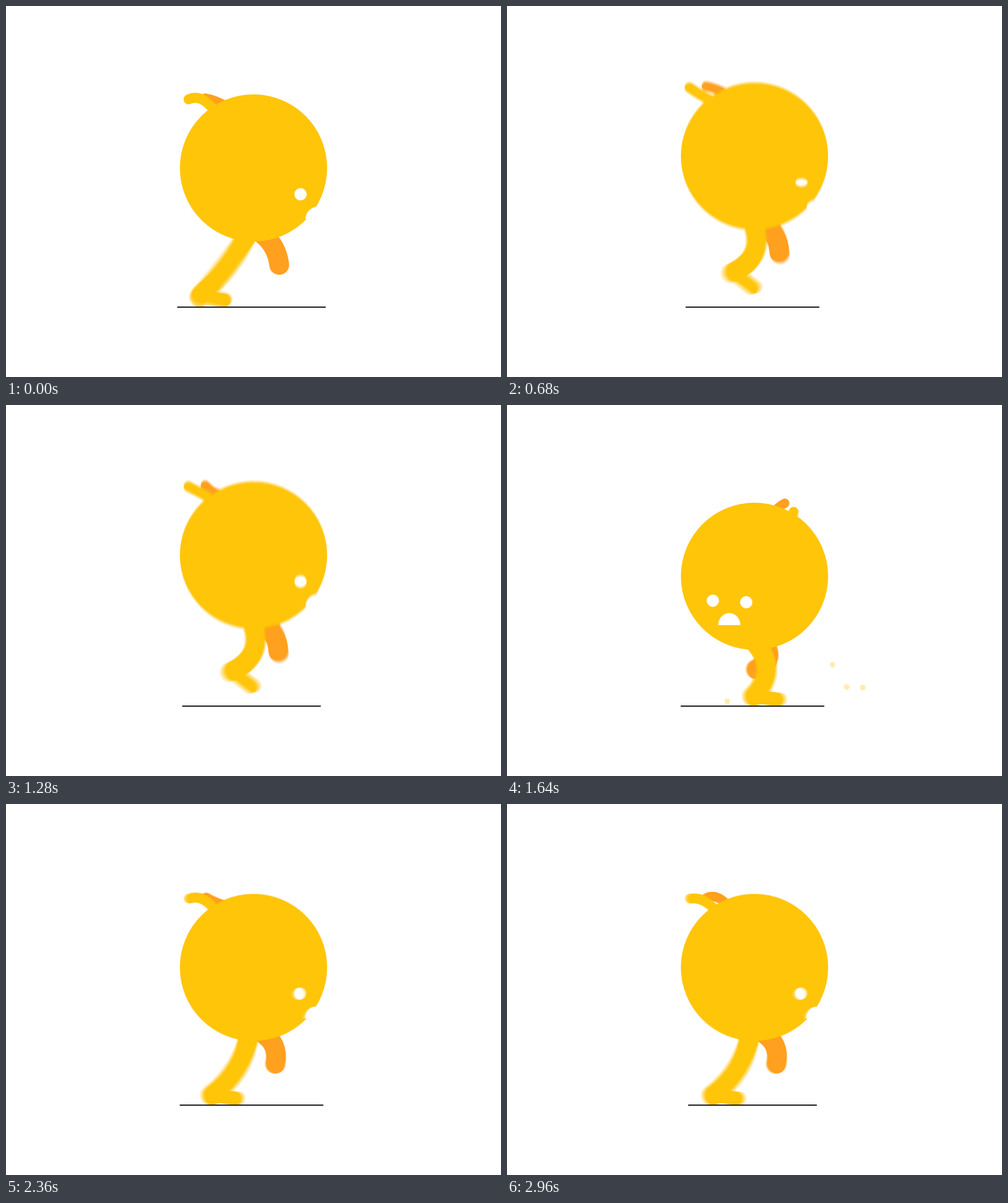
Write an HTML page with a canvas that moves like this. It is 800 by 600 pixels and loops after 3 s.

```html
<!DOCTYPE html>
<html lang="en">
<head>
<meta charset="utf-8">
<title>Hopping ball</title>
<style>
html, body { margin: 0; width: 100%; height: 100%; overflow: hidden; background: #fff; }
canvas { display: block; }
</style>
</head>
<body>
<canvas id="stage" width="800" height="600"></canvas>
<script>
const LOOP = 3000, STEP = 40, HOP = 600, LAND = 330, WAVE = 480;
const YELLOW = '#ffc509', ORANGE = '#ffa01e';
const SAMPLES = 10, SHUTTER = 18;
const { PI, sin, cos, hypot, sqrt, max, min, abs } = Math;

const stage = document.getElementById('stage').getContext('2d');
const layer = document.createElement('canvas');
layer.width = 800;
layer.height = 600;
const g = layer.getContext('2d');

const lerp = (a, b, p) => a + (b - a) * p;
const mix = (a, b, p) => a.map((v, i) => lerp(v, b[i], p));

// Eased 0 to 1 between two times
function ease(t, from, to) {
  const p = min(1, max(0, (t - from) / (to - from)));
  return p * p * (3 - 2 * p);
}

function curve(color, width, [x0, y0], [cx, cy], [x1, y1]) {
  g.strokeStyle = color;
  g.lineWidth = width;
  g.beginPath();
  g.moveTo(x0, y0);
  g.quadraticCurveTo(cx, cy, x1, y1);
  g.stroke();
}

function oval(color, x, y, rx, ry = rx, from = 0) {
  g.fillStyle = color;
  g.beginPath();
  g.ellipse(x, y, rx, ry, 0, from, PI * 2);
  g.fill();
}

// The knee moves forward as the foot comes closer than the leg's length
function drawLeg(color, hip, foot, length, flex) {
  const dx = foot[0] - hip[0], dy = foot[1] - hip[1], d = hypot(dx, dy);
  const bend = flex * sqrt(max(0, length ** 2 - d ** 2)) / d;
  const [mx, my] = mix(hip, foot, .5);
  curve(color, 32, hip, [mx + dy * bend, my - dx * bend], foot);
}

function drawBackLeg(t) {
  const swing = cos((t - 35) / HOP * 2 * PI);
  drawLeg(ORANGE, [12, 105], [15.5 + 28 * swing, 152.5 + 4.5 * swing], 62, .74);
}

function drawFrontLeg(t, cy) {
  const s = min(t / LAND, 1);
  const heel = t < LAND
    ? [lerp(311, 459, sin(s * PI / 2)), 471 - 290 * s * (1 - s) ** 2]
    : [lerp(459, 311, (t - LAND) / (HOP - LAND)), 471];
  const tilt = .13 + .6 * sin(s * 2 * PI) * (1 - s / 2);
  const toe = [heel[0] + 40 * cos(tilt), heel[1] + 40 * sin(tilt)];
  drawLeg(YELLOW, [lerp(400, heel[0], .1), cy + 106], heel, 130, .42);
  curve(YELLOW, 22, heel, heel, toe);
}

function drawTuft(color, width, base, tip, lift, turn) {
  const [mx, my] = mix(base, tip, .5);
  const arc = 16 * sin(PI * turn);
  curve(color, width, base, [mx, my - lift * (1 - turn) - arc], [tip[0], tip[1] - arc]);
}

function drawHair(now, turn) {
  const wave = shift => cos(now / WAVE * 2 * PI - shift);
  drawTuft(ORANGE, 15, mix([-44, -100], [40, -100], turn),
    mix([-78, -113], [70, -111], turn), 13 * wave(1.3), turn);
  drawTuft(YELLOW, 16, mix([-58, -85], [75, -75], turn),
    mix([-105, -111], [91, -95], turn), 9 + 15 * wave(0), turn);
}

function drawFace(turn, open) {
  const x = lerp(76, -91, turn), y = lerp(42.5, 39, turn);
  oval('#fff', x, y, 10, 10 * open);
  oval('#fff', x + 54, y + 2.5, 10, 10 * open);
  oval('#fff', lerp(103, -64.5, turn), lerp(82.5, 78.5, turn),
    19 - 3.5 * turn ** 8, 19.5 * open, PI);
}

function drawDust(t) {
  if (t < 270) return;
  const p = ease(t, 270, 440);
  g.globalAlpha = lerp(1, .32, p) * (1 - ease(t, 440, 480));
  for (const end of [[526, 420], [549, 456], [575, 457], [356, 479]]) {
    const start = end[0] > 400 ? [504, 467] : [429, 479];
    oval(YELLOW, ...mix(start, end, p), lerp(3, 4.5, p));
  }
  g.globalAlpha = 1;
}

function drawScene(time, now) {
  const t = (time + LOOP) % HOP;
  const cy = 262 - 38 * ease(t, 0, 160) + 53 * ease(t, 160, 375) - 15 * ease(t, 440, HOP);
  const turn = ease(t, 90, 275) - .14 * ease(t, 280, 440) - .86 * ease(t, 440, 567);
  const open = 1 - .35 * max(0, 1 - abs(now - 680) / 80);

  g.fillStyle = '#fff';
  g.fillRect(0, 0, 800, 600);
  g.lineCap = g.lineJoin = 'round';

  g.save();
  g.translate(400, cy);
  drawBackLeg(t);
  drawHair(now, turn);
  oval(YELLOW, 0, 0, 119);
  drawFace(turn, open);
  g.restore();

  drawFrontLeg(t, cy);
  drawDust(t);
}

function drawGround(now) {
  const k = now / STEP % 10;
  const half = 120 - 4 * min(k, 10 - k);
  stage.fillStyle = '#231f20';
  stage.fillRect(396.75 - half, 486, half * 2, 2);
}

function frame(ms) {
  const now = Math.floor(ms % LOOP / STEP) * STEP;
  // Average several moments for motion blur
  for (let i = 0; i < SAMPLES; i++) {
    drawScene(now + ((i + .5) / SAMPLES - .5) * SHUTTER, now);
    stage.globalAlpha = 1 / (i + 1);
    stage.drawImage(layer, 0, 0);
  }
  stage.globalAlpha = 1;
  drawGround(now);
}

const start = performance.now();
function tick() {
  frame(performance.now() - start);
  requestAnimationFrame(tick);
}
tick();
</script>
</body>
</html>
```
